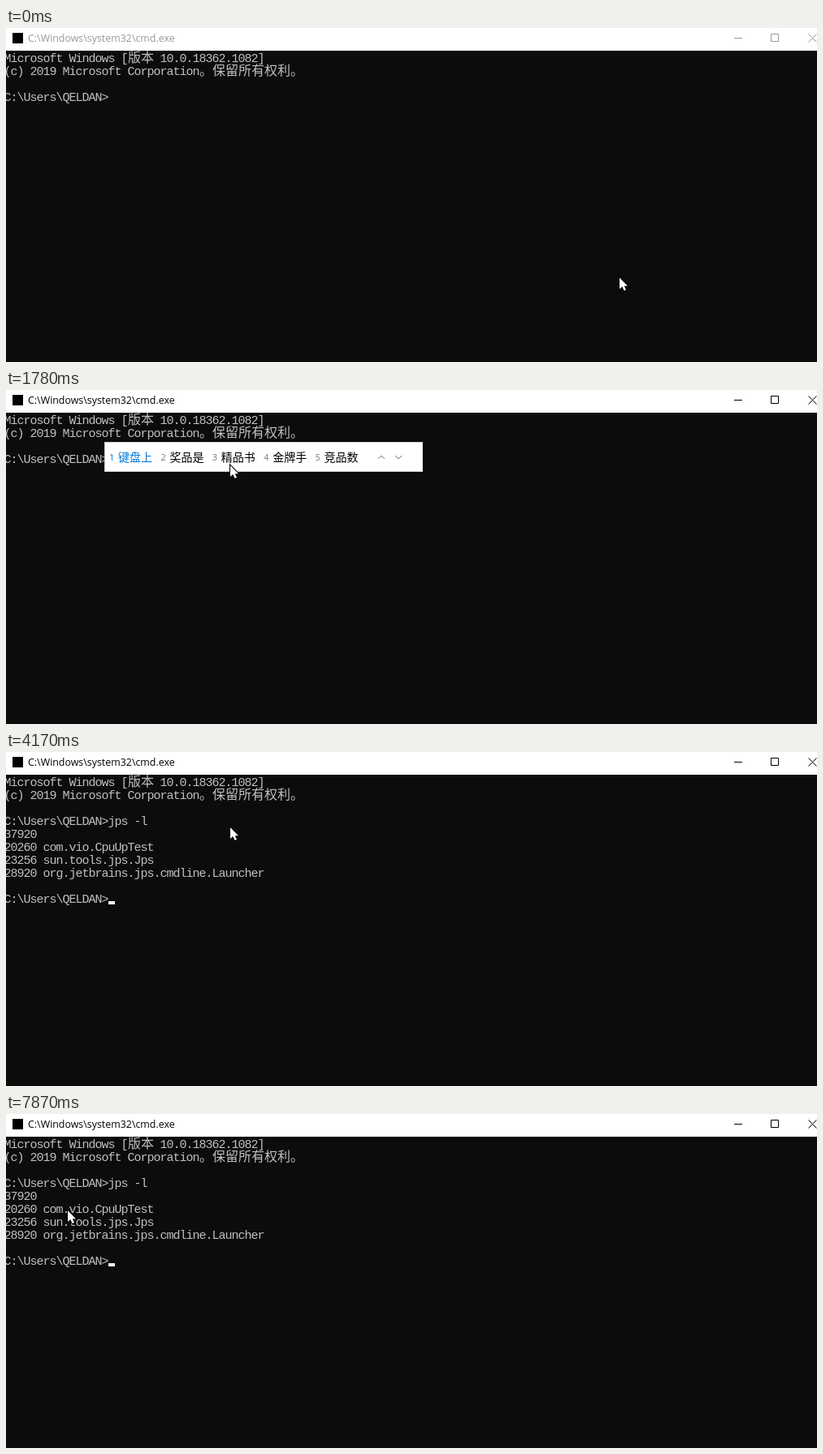
Write an HTML page with a canvas that moves like this. It is 998 px wide and 412 px high and loops after 8 s.

```html
<!DOCTYPE html>
<html lang="zh">
<head>
<meta charset="utf-8">
<title>cmd</title>
<style>
html, body { margin: 0; width: 100%; height: 100%; overflow: hidden; background: #0c0c0c; }
canvas { display: block; }
</style>
</head>
<body>
<canvas id="stage" width="998" height="412"></canvas>
<script>
const ctx = document.getElementById('stage').getContext('2d');
const LOOP = 8000, CELL = 8, ROW = 16, LEFT = -2, TOP = 28;
const BLINK = 535, SAMPLE = 76.5;
const CJK = '"Noto Sans CJK SC", "Noto Sans CJK", sans-serif';
const MONO = '15px "Liberation Mono", monospace';
const HAN = '300 16px ' + CJK;
const UI = '12.4px "Open Sans", sans-serif';
const PROMPT = 'C:\\Users\\QELDAN>';
const PATH = 'C:\\Windows\\system32\\cmd.exe';
const BANNER = [
  'Microsoft Windows [版本 10.0.18362.1082]',
  '(c) 2019 Microsoft Corporation。保留所有权利。'
];
const OUTPUT = [
  '37920',
  '20260 com.vio.CpuUpTest',
  '23256 sun.tools.jps.Jps',
  '28920 org.jetbrains.jps.cmdline.Launcher'
];

// Each event changes part of the state; `off` is when the caret next blinks out
const EVENTS = [
  { at: 0, cmd: '', lines: 0 },
  { at: 370, active: true, off: 920 },
  { at: 1470, draft: 'j' },
  { at: 1550, words: '键盘 奖品 精品 金牌 竞品' },
  { at: 1780, words: '键盘上 奖品是 精品书 金牌手 竞品数' },
  { at: 2010, draft: '', words: '', cmd: 'jps', off: 2470 },
  { at: 2390, cmd: 'jps ' },
  { at: 2930, cmd: 'jps -', off: 3000 },
  { at: 3170, draft: 'l', words: '了 来 里 老 啦' },
  { at: 3630, draft: '', words: '', cmd: 'jps -l', off: 4170 },
  { at: 3860, running: true },
  { at: 4090, lines: OUTPUT.length },
  { at: 4170, running: false, done: true, off: 5100 }
];

// Pointer strokes along cubic curves; each ends where the next begins
const STROKES = [
  { at: 70, steps: 5, path: [[755, 308], [600, 235], [430, 110], [264, 77]] },
  { at: 520, steps: 1, path: [[264, 77], [268, 82], [272, 88], [276, 93]] },
  { at: 5410, steps: 8, ease: 2, path: [[276, 93], [230, 10], [107, 165], [26, 117]] },
  { at: 6330, steps: 11, path: [[26, 117], [-25, 95], [66, 154], [23, 118]] },
  { at: 7180, steps: 10, path: [[23, 118], [180, 119], [180, 119], [76, 119]] }
];

function rect(x, y, w, h, color) {
  ctx.fillStyle = color;
  ctx.fillRect(x, y, w, h);
}

function label(text, x, y, font, color, align = 'left') {
  ctx.font = font;
  ctx.fillStyle = color;
  ctx.textAlign = align;
  ctx.fillText(text, x, y);
}

function stroke(color, path) {
  ctx.strokeStyle = color;
  ctx.lineWidth = 1;
  ctx.stroke(new Path2D(path));
}

function print(text, row) {
  let x = LEFT;
  for (const ch of text) {
    const wide = ch > '\u2fff';
    const w = wide ? 2 * CELL : CELL;
    label(ch, x + w / 2, TOP + row * ROW + 14, wide ? HAN : MONO, '#c0c0c0', 'center');
    x += w;
  }
}

function titleBar({ active, running }) {
  const ink = active ? '#000' : '#999';
  rect(0, 0, 998, TOP, '#fff');
  rect(8, 6, 13, 13, '#000');
  label(PATH + (running ? ' - jps -l' : ''), 27, 17, UI, ink);
  stroke(ink, 'M896 12.5h10 M941.5 7.5h9v9h-9z M987.5 7.5l10 10 m0 -10l-10 10');
}

function caret({ off, cmd, running, done, lines }, t) {
  const hidden = t >= off && Math.floor((t - off) / BLINK) % 2 === 0;
  if (hidden) return;
  const col = running ? 0 : PROMPT.length + (done ? 0 : cmd.length);
  const row = running ? 4 + lines : done ? 9 : 3;
  rect(LEFT + col * CELL, TOP + row * ROW + 12, CELL, 4, '#f2f2f2');
}

function composition(draft, col) {
  const x = LEFT + col * CELL;
  rect(x, 91, CELL, 1, '#ccc');
  rect(x + CELL - 1, 77, 1, 15, '#ccc');
}

function candidates(words, col) {
  const list = words.split(' ');
  const x = LEFT + col * CELL - 5, y = 64;
  const pitch = 22.6 + 13.6 * list[0].length;
  const width = Math.round(pitch * list.length + 75);
  rect(x, y, width, 37, '#ccc');
  rect(x + 1, y + 1, width - 2, 35, '#fff');
  list.forEach((word, i) => {
    const left = x + 6 + i * pitch;
    label(i + 1, left, y + 23, '11px "Open Sans", sans-serif', i ? '#777' : '#0078d7');
    label(word, left + 11, y + 24, '14px ' + CJK, i ? '#000' : '#0078d7');
  });
  stroke('#777', `M${x + width - 55} 85l4 -4l4 4 m13 -4l4 4l4 -4`);
}

function pointerAt(t) {
  const { at, steps, ease = 1, path } = STROKES.findLast(s => s.at <= t) || STROKES[0];
  // Allow a few ms because samples fall on a 10 ms grid
  const taken = Math.floor((t - at + 4) / SAMPLE) + 1;
  const u = Math.max(0, Math.min(1, taken / steps));
  const s = 1 - (1 - u) ** ease, r = 1 - s;
  const weights = [r ** 3, 3 * r * r * s, 3 * r * s * s, s ** 3];
  return [0, 1].map(axis =>
    Math.round(path.reduce((sum, p, i) => sum + p[axis] * weights[i], 0)));
}

function pointer(t) {
  const arrow = new Path2D('M0 0V14L3.3 11L5.6 16L8 15L5.8 10.2H10Z');
  ctx.save();
  ctx.translate(...pointerAt(t));
  ctx.strokeStyle = '#000';
  ctx.lineWidth = 2;
  ctx.stroke(arrow);
  ctx.fillStyle = '#fff';
  ctx.fill(arrow);
  ctx.restore();
}

function draw(t) {
  const state = Object.assign({}, ...EVENTS.filter(e => e.at <= t));
  const { cmd, draft, words, lines, done, active } = state;
  const col = PROMPT.length + cmd.length;

  rect(0, 0, 998, 412, '#0c0c0c');
  titleBar(state);
  BANNER.forEach(print);
  print(PROMPT + cmd + (draft || ''), 3);
  OUTPUT.slice(0, lines).forEach((text, i) => print(text, 4 + i));
  if (done) print(PROMPT, 9);

  if (draft) composition(draft, col);
  else if (active) caret(state, t);
  if (words) candidates(words, col);
  pointer(t);
}

const begin = performance.now();
function tick() {
  draw((performance.now() - begin) % LOOP);
  requestAnimationFrame(tick);
}
tick();
</script>
</body>
</html>
```
